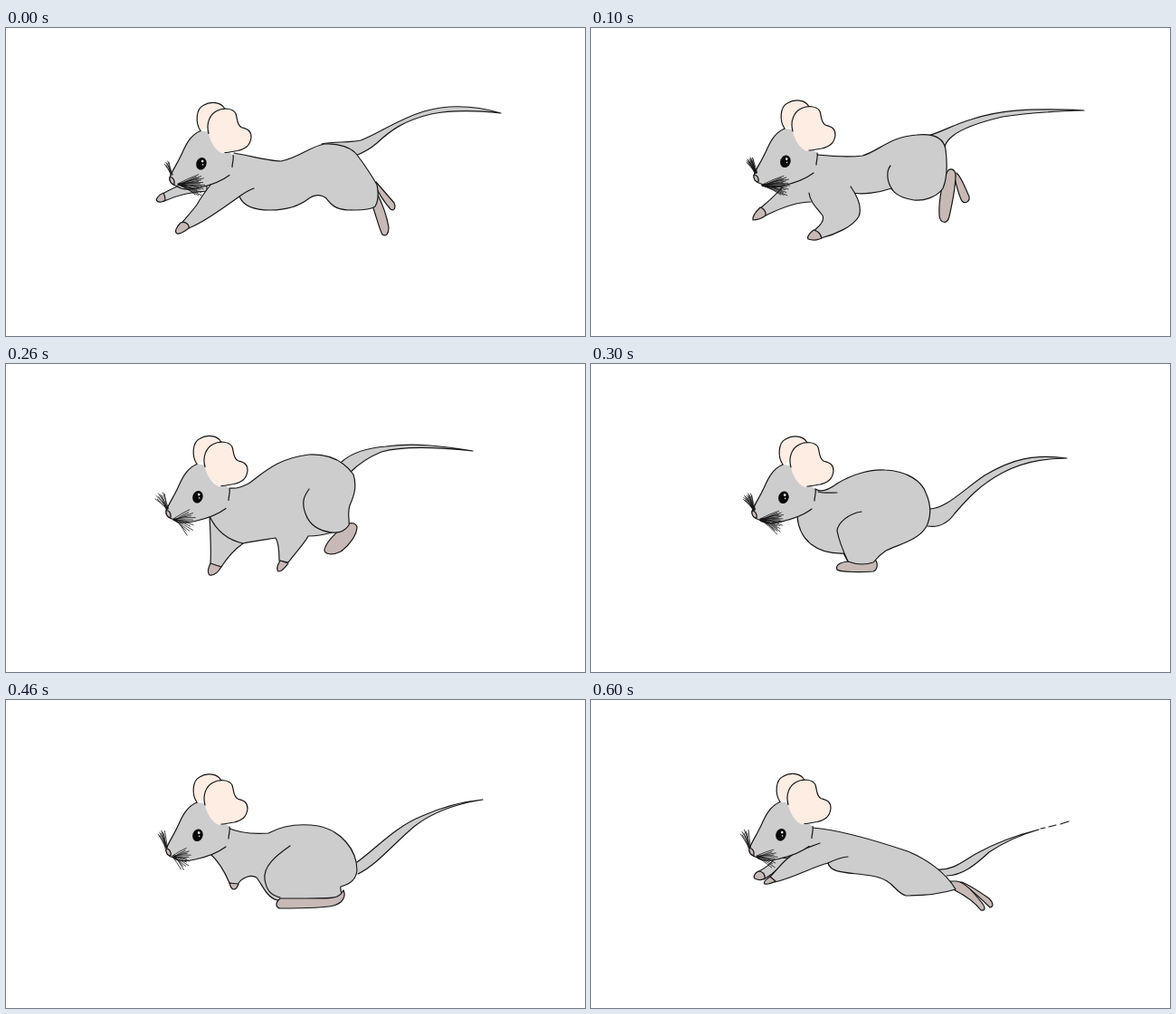
Write an HTML page that moves like this. It is 640x340 px and loops after 0.7 s.

```html
<!DOCTYPE html>
<html lang="en">
<head>
<meta charset="utf-8">
<title>Running mouse</title>
<style>
html, body { margin: 0; width: 100%; height: 100%; overflow: hidden; background: #fff; }
#strip { display: flex; width: 4480px; height: 340px; animation: run 700ms steps(7) infinite; }
@keyframes run { to { transform: translateX(-4480px); } }
svg { flex: none; width: 640px; height: 340px; }
path { stroke: #161616; stroke-width: 1.2; stroke-linecap: round; stroke-linejoin: round; }
.fur { fill: #cdcdcd; }
.patch { fill: #cdcdcd; stroke: none; }
.paw { fill: #c7b9b5; }
.ear { fill: #feede3; }
.blush { fill: #feede3; stroke: none; }
.line { fill: none; }
.hair { fill: none; stroke-width: .8; }
</style>
</head>
<body>
<div id="strip"></div>
<script>
const part = kind => d => `<path class="${kind}" d="${d}"/>`;
const [fur, patch, paw, ear, blush, line, hair] =
  ['fur', 'patch', 'paw', 'ear', 'blush', 'line', 'hair'].map(part);

// Whiskers spread between two angles (degrees, y down) with uneven lengths.
function fan(x, y, from, to, length, count) {
  let d = '';
  for (let i = 0; i < count; i++) {
    const a = (from + (to - from) * i / (count - 1)) * Math.PI / 180;
    const r = length * (0.72 + 0.28 * ((i * 0.618 + 0.4) % 1));
    const sx = x + (i * 7 % 5) * 0.6, sy = y + (i * 3 % 4) * 0.5;
    const ex = x + r * Math.cos(a), ey = y + r * Math.sin(a);
    d += `M${sx},${sy}Q${(sx + ex) / 2},${(sy + ey) / 2 - 1} ${ex.toFixed(1)},${ey.toFixed(1)}`;
  }
  return hair(d);
}

const head =
  patch('M214,111L222,112L242,132L250,138L249,152L246,159L215,150L208,125Z') +
  fur('M214,111C202,116 197,128 193,137C188,148 182,156 180,163C180,168 184,171 188,172C194,177 204,176 212,174C226,171 238,166 246,160') +
  patch('M214,113L224,112L242,132L248,140L246,158L225,150Z') +
  line('M250,138C251,142 249,147 249,151') +
  ear('M214,111C208,102 209,87 217,83C225,78 237,79 241,87L228,105') +
  blush('M223,114C225,124 231,133 238,136L250,133L245,100Z') +
  ear('M223,114C220,103 224,93 232,89C239,85 250,86 253,92C255,98 254,104 259,107C264,109 270,109 270,118C269,128 263,131 255,133C249,134 245,135 241,135') +
  paw('M180,162C183,162 186,165 185,170C182,170 179,167 180,162Z') +
  '<ellipse cx="215" cy="147.3" rx="5.6" ry="6.9" transform="rotate(20 215 147)" fill="#080808"/>' +
  '<circle cx="216.2" cy="144.6" r="1.3" fill="#fff"/><circle cx="216.6" cy="148.4" r=".8" fill="#ddd"/>';

// Each pose: head offset, body parts, whiskers.
const poses = [
  [1, 2.5,
    fur('M349,128C362,125 380,127 392,124C410,118 432,101 462,92C490,84 520,86 547,94C520,91 490,91 470,95C440,102 425,113 410,127C402,134 394,138 386,141') +
    paw('M407,171C412,184 418,192 425,200C430,203 431,197 429,193C423,186 415,177 409,170') +
    paw('M405,196C409,207 412,220 416,228C421,231 423,226 423,220C421,208 416,194 410,182') +
    fur('M175,182C182,178 190,174 198,172L222,174L222,180C205,181 190,184 175,191') +
    paw('M174,182C169,184 165,189 167,191C169,193 174,192 176,190C176,187 175,184 174,182Z') +
    fur('M252,138C270,141 290,147 304,147C322,144 338,130 352,128C368,127 382,132 388,140C400,156 406,166 410,173C412,183 411,192 408,197C402,201 390,201 378,201C362,200 358,193 354,188C348,183 340,184 335,188C325,196 310,201 292,201C272,201 262,196 258,186L238,200C225,209 212,217 202,221L191,219C196,213 206,202 211,195C215,188 219,182 227,172') +
    paw('M193,215C188,220 186,225 189,227C193,228 199,223 202,221C203,217 198,213 193,215Z') +
    line('M258,186C262,183 268,179 274,177'),
    fan(182, 161, 238, 262, 15, 6) + fan(190, 172, -24, 32, 30, 20)],
  [0, 0,
    fur('M372,119C385,116 400,107 420,101C450,91 480,88 545,91C510,92 480,94 455,98C425,105 410,111 400,119C395,123 392,127 391,131') +
    paw('M400,159C404,172 406,185 410,191C414,195 419,191 418,186C414,178 410,165 404,160') +
    paw('M395,157C389,165 384,190 385,207C386,216 394,217 396,208C399,195 403,175 403,162C402,155 397,155 395,157Z') +
    patch('M250,139L300,142L289,182L243,192L228,190L208,180L212,165Z') +
    fur('M211,176C203,186 194,193 187,199L193,207C205,201 225,192 243,192') +
    paw('M187,198C182,203 178,209 179,212C184,212 189,210 193,207C194,203 191,199 187,198Z') +
    fur('M250,140C270,142 285,143 300,141C318,136 330,120 360,118C380,116 390,122 392,134C394,150 394,165 389,177C382,187 368,191 357,190C345,188 336,184 332,177C318,182 300,184 288,182') +
    line('M331,152C326,158 327,170 333,178') +
    fur('M287,175C294,185 300,198 296,208C290,219 270,228 254,232L246,224C254,218 258,212 256,207C250,199 242,192 241,182') +
    paw('M246,223C241,227 239,231 240,233C246,235 251,234 255,232C254,228 251,224 246,223Z'),
    fan(181, 159, 230, 263, 17, 14) + fan(189, 173, -22, 28, 31, 20)],
  [-3, -.5,
    fur('M368,111C378,100 395,93 420,91C450,87 480,90 516,96C480,92 440,90 415,97C400,103 388,112 380,120') +
    paw('M379,176C368,183 354,195 352,205C352,211 362,211 370,207C380,200 388,188 388,180C387,176 383,175 379,176Z') +
    fur('M247,137C256,138 262,135 268,132C285,120 300,104 335,100C360,99 375,109 384,122C388,135 385,145 380,156C377,165 380,172 379,178C374,185 368,187 360,186C350,189 342,190 334,190C330,198 320,208 312,219L302,217C302,208 302,198 298,192C285,194 270,196 262,198C255,203 245,213 238,224L226,221C227,205 226,190 225,168') +
    line('M225,168C232,183 244,194 262,198M360,186C345,184 335,177 331,165C326,152 330,145 335,138') +
    paw('M226,220C223,226 223,231 225,233C231,234 235,229 238,224Z') +
    paw('M303,217C300,222 299,227 301,229C306,229 309,224 312,220Z'),
    fan(177, 159, 220, 264, 19, 9) + fan(185, 171, -30, 50, 25, 13)],
  [-2, 0,
    fur('M374,160C392,160 410,140 435,123C465,105 490,99 526,104C500,104 475,109 455,120C430,133 415,150 402,165C395,175 385,181 372,179') +
    paw('M284,218C275,219 270,222 272,227C275,230 300,230 312,229C317,227 318,219 313,215Z') +
    fur('M248,138C255,143 264,138 272,132C290,121 310,116 325,117C350,118 366,130 370,142C376,155 376,168 371,179C362,195 340,199 326,206C320,210 316,214 312,219C303,222 292,221 284,218L279,209C250,210 230,195 228,168') +
    line('M299,163C285,165 273,175 272,184C274,195 279,207 284,218M251,141C258,143 264,142 272,142'),
    fan(179, 160, 225, 265, 18, 14) + fan(187, 171, -23, 42, 27, 21)],
  [-3, 2,
    fur('M388,179C410,163 430,140 460,128C485,117 505,112 527,110C495,115 470,125 452,139C430,157 410,182 389,192') +
    fur('M245,141C258,147 275,148 290,147C305,139 325,136 345,139C370,144 388,165 388,188C387,200 378,204 370,206C369,212 373,214 369,218L300,221C288,218 284,205 277,196C271,192 260,196 256,204L247,202C242,190 235,178 225,169') +
    line('M314,161C298,172 284,184 286,198C288,210 292,215 303,218') +
    paw('M247,202C248,206 250,209 252,209C254,209 256,206 257,203Z') +
    paw('M303,219C297,224 298,230 304,230C325,230 350,230 362,227C373,224 376,216 373,210C370,216 366,219 350,219Z'),
    fan(176, 162, 241, 268, 19, 8) + fan(184, 172, -29, 58, 21, 14)],
  [-5, 1,
    fur('M402,188C415,187 420,178 430,169C450,150 480,137 518,132C490,139 468,149 455,162C440,180 425,196 403,197') +
    paw('M402,203C394,209 382,220 379,228C379,233 388,232 394,228C402,222 409,212 407,204Z') +
    patch('M245,140L300,153L284,189L264,182L238,184L237,163Z') +
    fur('M237,164C236,175 242,179 236,184L239,191C248,189 255,187 266,182') +
    paw('M236,184C231,186 228,190 229,193C233,194 237,192 239,190Z') +
    fur('M245,140C265,141 280,146 297,152C320,158 345,158 366,163C390,170 404,185 403,197C404,208 396,222 382,226C365,229 345,226 338,216C320,209 300,197 281,188') +
    line('M325,190C334,197 336,207 338,216') +
    fur('M284,161C290,172 292,184 287,186C278,190 271,190 268,192L258,204L252,199C256,192 261,186 266,181') +
    paw('M252,199C249,204 248,208 250,209C254,209 257,206 259,202Z'),
    fan(178, 161, 228, 268, 19, 15) + fan(184, 171, -25, 50, 28, 22)],
  [-5, 1.5,
    fur('M383,187C400,188 410,179 425,170C450,156 475,148 495,143C470,150 455,158 440,168C425,182 410,194 393,194') +
    line('M497,142L502,141M506,140L514,138M519,137L528,134') +
    paw('M408,201C420,209 430,218 441,229C446,228 444,223 440,219C430,212 420,205 410,201Z') +
    paw('M397,200L402,210C412,215 424,223 431,232C436,233 436,229 433,225C424,214 414,201 404,200Z') +
    fur('M184,190C190,187 198,182 203,175L220,174L200,192L191,198') +
    paw('M185,189C181,191 179,195 181,197C185,199 189,199 192,197C193,193 190,189 185,189Z') +
    fur('M245,141C275,143 320,157 350,167C370,175 392,190 403,209C390,213 370,216 348,216C335,212 335,198 310,194C285,190 265,192 262,180C245,184 225,196 203,201L198,195C208,185 215,174 229,167') +
    line('M262,180C268,177 275,174 284,173M253,158C240,163 230,166 222,171') +
    paw('M198,195C193,198 190,202 192,203C196,204 200,202 204,200Z'),
    fan(174, 162, 238, 270, 20, 8) + fan(183, 172, -20, 38, 24, 11)]
];

document.getElementById('strip').innerHTML = poses.map(([x, y, body, whiskers]) =>
  `<svg viewBox="0 0 640 340">${body}<g transform="translate(${x} ${y})">${head}</g>${whiskers}</svg>`
).join('');
</script>
</body>
</html>
```
